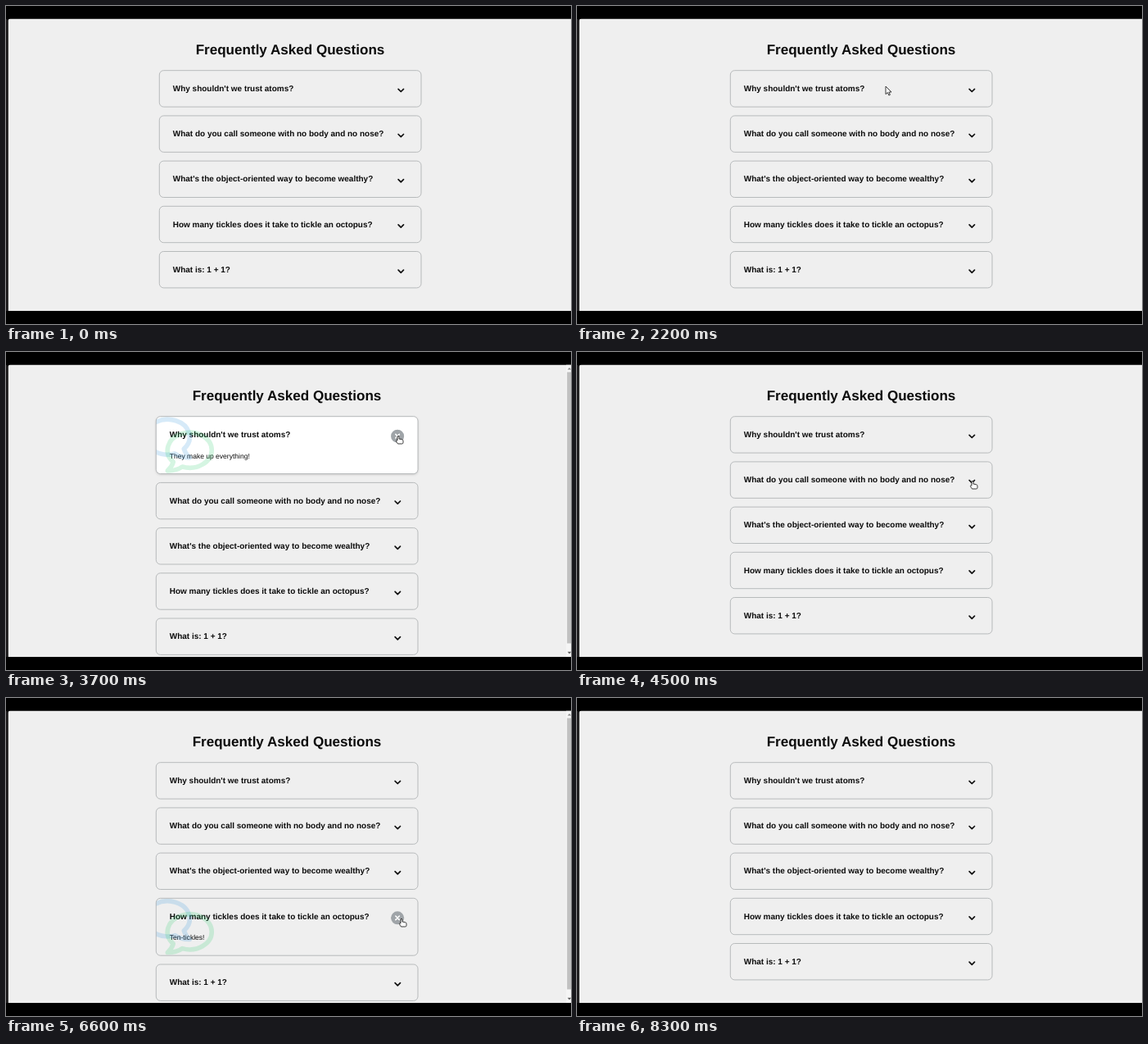
These frames come from a looping animation (690 px wide and 388 px high, 9300 ms). An HTML page:

```html
<!DOCTYPE html>
<html lang="en">
<head>
<meta charset="utf-8">
<title>Frequently Asked Questions</title>
<style>
  html, body { margin: 0; width: 100%; height: 100%; overflow: hidden; background: #000; }
  svg { display: block; width: 690px; height: 388px; }
  text { font-family: "Liberation Sans", Arial, sans-serif; fill: #0c0c0c; text-rendering: geometricPrecision; }
  .title { font-size: 17.07px; font-weight: bold; text-anchor: middle; }
  .question { font-size: 9.98px; font-weight: bold; }
  .answer { font-size: 8.53px; }
  .frame { fill: none; stroke: #a9acae; stroke-width: .8; }
  .bubble { fill: none; stroke-width: 5.6; stroke-linejoin: round; opacity: .2; }
  .chevron { fill: none; stroke: #111; stroke-width: 1.7; stroke-linecap: round; stroke-linejoin: round; }
  .cross { stroke: #fff; stroke-width: 1.5; stroke-linecap: round; }
  .pointer { fill: #fff; stroke: #222; stroke-width: .9; stroke-linejoin: round; }
</style>
</head>
<body>
<svg id="stage" viewBox="0 0 690 388">
  <defs>
    <clipPath id="view"><rect x="2.5" y="15.5" width="687.5" height="356.5"/></clipPath>
  </defs>
  <rect width="690" height="388"/>
  <rect x="0" y="16" width="2" height="356" fill="#1c1a1c"/>
  <g clip-path="url(#view)">
    <path d="M2.5 372V18.5Q2.5 15.5 5.5 15.5H690V372Z" fill="#efefef"/>
    <g id="content">
      <text class="title" x="347" y="58.6">Frequently Asked Questions</text>
    </g>
    <g id="scrollbar">
      <rect x="684" y="15.5" width="8" height="357" fill="#f5f5f5"/>
      <rect x="685.2" y="24.5" width="6" height="331" fill="#c1c1c1"/>
      <path d="M685.8 21.5L688 19L690.2 21.5Z" fill="#888"/>
      <path d="M685.8 365.8L688 368.3L690.2 365.8Z" fill="#555"/>
    </g>
    <g id="cursor">
      <path id="arrow" class="pointer" d="M0 0V9.6L2.3 7.5L3.9 11L5.4 10.3L3.9 7H7Z"/>
      <path id="hand" class="pointer" d="M-1 6V1Q0 -.6 1 1V4L4.5 4.6Q6 5 6 6.5V8.5Q6 10 4.5 10H0Q-1 10 -1.6 8.6L-2.5 6.2Q-2 5 -1 6Z"/>
    </g>
  </g>
</svg>
<script>
const LOOP = 9300, STEP = 100, FADE = 300;
const LEFT = 187.3, TOP = 78.7, WIDTH = 319.7, HEIGHT = 44.4, PITCH = 55.2, GROW = 25.5;

// question, answer, opening time, closing time
const FAQS = [
  ["Why shouldn't we trust atoms?", "They make up everything!", 3200, 3900],
  ["What do you call someone with no body and no nose?", "Nobody knows.", 4700, 5400],
  ["What's the object-oriented way to become wealthy?", "Inheritance."],
  ["How many tickles does it take to tickle an octopus?", "Ten-tickles!", 6600, 7400],
  ["What is: 1 + 1?", "Depends on who you ask."]
];

// time, x, y of the pointer tip
const PATH = [
  [1800, 376, 31], [1900, 340, 52], [2000, 305, 84], [2100, 335, 99], [2200, 377, 98],
  [2300, 377, 98], [2600, 440, 102], [2900, 479, 102], [3900, 479, 102], [4500, 483, 157],
  [5300, 483, 157], [5400, 483, 158], [5600, 483, 158], [6200, 483, 269], [7800, 483, 269],
  [8000, 476, 170], [8200, 441, 18]
];

const find = id => document.getElementById(id);
const show = (node, on) => node.style.display = on ? "" : "none";
const shift = (node, x, y) => node.setAttribute("transform", `translate(${x} ${y})`);

function add(parent, tag, attrs, text) {
  const node = document.createElementNS("http://www.w3.org/2000/svg", tag);
  for (const key in attrs) node.setAttribute(key, attrs[key]);
  if (text) node.textContent = text;
  return parent.appendChild(node);
}

function addBubble(parent, color, transform) {
  add(parent, "path", {
    class: "bubble", stroke: color, transform,
    d: "M-20 14.5A27 21.5 0 1 1 -9 20.3Q-17 25.5 -27 25.2Q-21.5 20 -20 14.5Z"
  });
}

function buildCard([question, answer, open, close], index) {
  const group = add(find("content"), "g", {});
  const box = { width: WIDTH, height: HEIGHT, rx: 5.3 };
  const fill = add(group, "rect", { ...box, fill: "#fff" });
  fill.style.filter = "drop-shadow(0 1.6px 1.6px rgba(0,0,0,.18))";
  const clip = add(find("stage").querySelector("defs"), "clipPath", { id: "card" + index });
  add(clip, "rect", { ...box, height: HEIGHT + GROW });

  add(group, "text", { class: "question", x: 16.5, y: 25.4 }, question);
  const details = add(group, "g", {});
  add(details, "text", { class: "answer", x: 16.5, y: 51.2 }, answer);
  const art = add(details, "g", { "clip-path": `url(#card${index})` });
  addBubble(art, "#3498db", "translate(14 25) scale(-1 1)");
  addBubble(art, "#2ecc71", "translate(41 41)");
  add(details, "circle", { cx: 294.8, cy: 24, r: 8, fill: "#9fa4a8" });
  add(details, "path", { class: "cross", d: "M292.5 21.7l4.6 4.6m0 -4.6l-4.6 4.6" });

  const chevron = add(group, "path", { class: "chevron", d: "M291.8 22.6l3.2 3.2l3.2 -3.2" });
  const frame = add(group, "rect", { ...box, class: "frame" });
  return { group, fill, details, chevron, frame, open, close };
}

const cards = FAQS.map(buildCard);

function ease(p) {
  p = Math.min(1, Math.max(0, p));
  return 1 - (1 - p) ** 2.5;
}

function pointerAt(t) {
  const next = PATH.findIndex(key => key[0] > t);
  if (next < 0) return t === PATH.at(-1)[0] ? PATH.at(-1).slice(1) : null;
  if (next === 0) return null;
  const [t0, x0, y0] = PATH[next - 1], [t1, x1, y1] = PATH[next];
  const p = (t - t0) / (t1 - t0);
  return [x0 + (x1 - x0) * p, y0 + (y1 - y0) * p];
}

function draw(t) {
  let extra = 0;
  cards.forEach((card, i) => {
    const isOpen = t >= card.open && t < card.close;
    const white = !card.open ? 0 : ease((t - card.open) / FADE) - ease((t - card.close) / FADE);
    const height = HEIGHT + (isOpen ? GROW : 0);
    shift(card.group, LEFT, TOP + i * PITCH + extra);
    card.fill.setAttribute("height", height);
    card.frame.setAttribute("height", height);
    card.fill.style.opacity = white;
    show(card.details, isOpen);
    show(card.chevron, !isOpen);
    extra += height - HEIGHT;
  });
  shift(find("content"), extra ? -4 : 0, 0);
  show(find("scrollbar"), extra);

  const tip = pointerAt(t);
  show(find("cursor"), tip);
  if (!tip) return;
  const [x, y] = tip;
  const overButton = cards.some((_, i) => Math.hypot(x - 482, y - (TOP + 24 + i * PITCH)) < 9);
  shift(find("cursor"), x, y);
  show(find("hand"), overButton);
  show(find("arrow"), !overButton);
}

const start = performance.now();
function tick() {
  const t = (performance.now() - start) % LOOP;
  draw(Math.floor(t / STEP) * STEP);
  requestAnimationFrame(tick);
}
draw(0);
requestAnimationFrame(tick);
</script>
</body>
</html>
```
